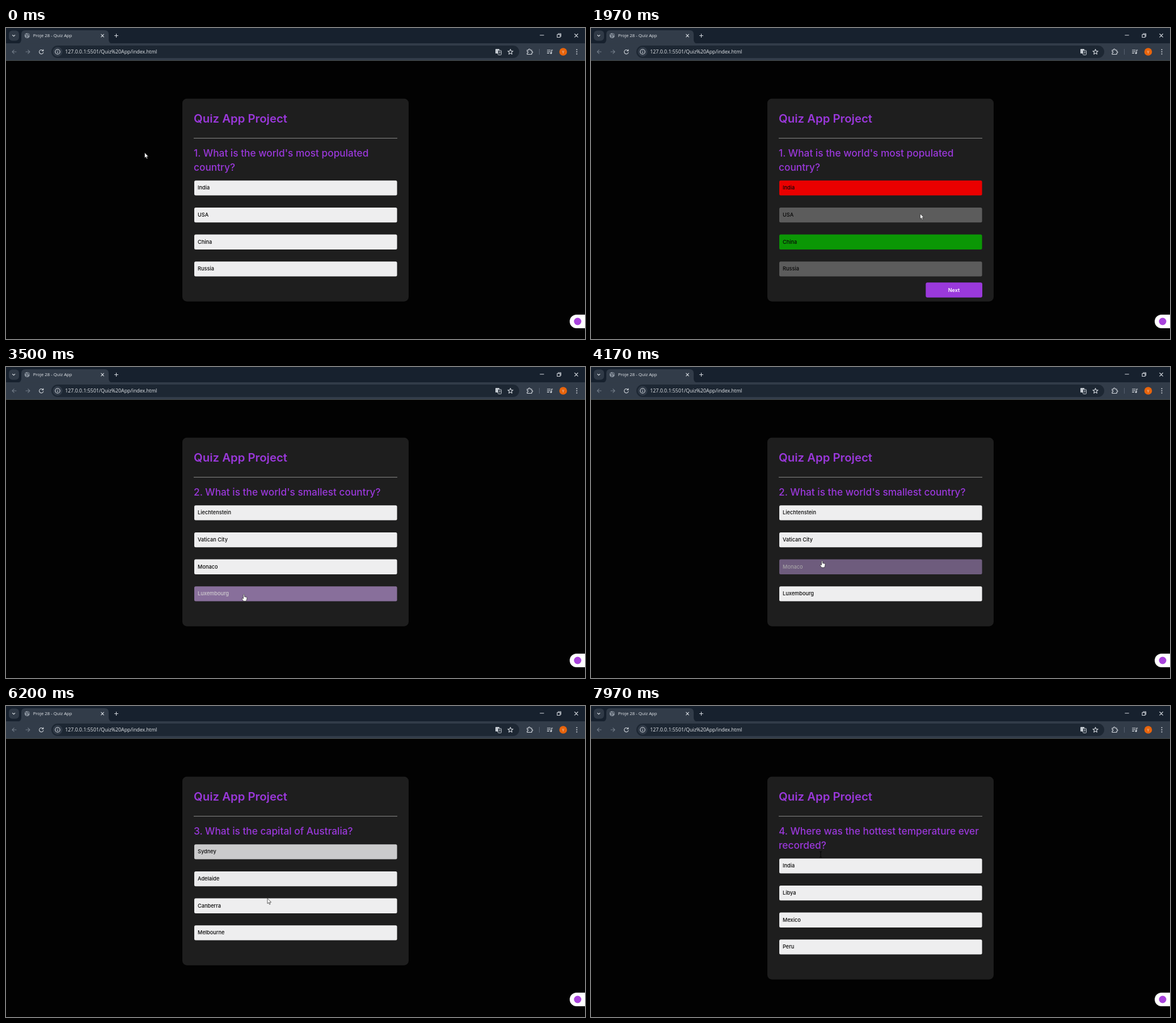
An HTML page for the animation above (8 s loop, 1021x549 px).

```html
<!DOCTYPE html>
<html lang="en">
<head>
<meta charset="utf-8">
<title>Quiz App</title>
<style>
html, body { margin: 0; width: 100%; height: 100%; overflow: hidden; background: #020202; }
svg { display: block; width: 100%; height: 100%; }
.ui { font-family: "Open Sans", "Noto Sans", sans-serif; fill: #e6e9ed; }
.quiz { font-family: Inter, "Open Sans", sans-serif; font-weight: 500; }
.icon { fill: none; stroke: #d3d8de; stroke-width: 1.1; stroke-linecap: round; stroke-linejoin: round; }
.dim { stroke: #737d89; }
</style>
</head>
<body>
<svg viewBox="0 0 1021 549">
  <rect width="1021" height="549" fill="#020202"/>

  <!-- Browser window -->
  <rect width="1021" height="28" fill="#17212e"/>
  <rect y="27" width="1021" height="31" fill="#323c49"/>
  <path d="M0 57.5H1021" stroke="#484d4c"/>
  <rect x="5" y="4.500" width="18" height="18" rx="6" fill="#303a47"/>
  <path class="icon" d="M11.500 12.500l2.100 2.100 2.100-2.100"/>
  <path d="M20 27.500Q27 27.500 27 20V11Q27 4 34 4H174Q181 4 181 11V20Q181 27.500 188 27.500Z" fill="#323c49"/>
  <circle cx="37.300" cy="13.500" r="4.600" fill="#89929d"/>
  <path d="M34 11.500q3 0 3.200 2.200t-1.200 3M38.500 9.500q-.5 2.500 3 3.500" fill="none" stroke="#3c4653" stroke-width="1.200"/>
  <text class="ui" x="47.700" y="16.300" font-size="7.750">Proje 28 - Quiz App</text>
  <path class="icon" d="M167.800 11.200l4.600 4.600m0-4.600l-4.600 4.600M191.500 13.500h6m-3-3v6"/>
  <g class="icon" stroke-width="1">
    <path d="M941.800 12.700h6.500"/>
    <path d="M972 11.500h5v5h-5zM973.500 10h5v5"/>
    <path d="M1002.800 10.500l5.600 5.600m0-5.600l-5.600 5.600"/>
  </g>
  <path class="icon dim" d="M18 42h-7m3.200-3.200L11 42l3.200 3.200M35 42h7m-3.200-3.200L42 42l-3.200 3.200"/>
  <path class="icon" d="M65.300 40a3.700 3.700 0 1 0 .6 3M65.800 38v2.500h-2.500"/>
  <rect x="80" y="31" width="825" height="22" rx="11" fill="#1d2733"/>
  <circle cx="91" cy="42" r="8.500" fill="#303a47"/>
  <g class="icon"><circle cx="91" cy="42" r="4.200"/><path d="M91 42v2M91 40v.1"/></g>
  <text class="ui" x="104.300" y="45.200" font-size="8.800">127.0.0.1:5501/Quiz%20App/index.html</text>
  <rect x="863" y="37" width="7" height="8" rx="1" fill="#c3c9d0"/>
  <rect x="867.500" y="39.500" width="6" height="8" rx="1" fill="#1d2733" stroke="#c3c9d0"/>
  <path d="M869 42h3.400m-1.700-1v1m1 0q-.6 2.300-2.500 3m.5-2q.8 1.500 2.300 2" fill="none" stroke="#c3c9d0" stroke-width=".7"/>
  <path id="star" class="icon"/>
  <path class="icon" d="M919 39h2.500q-.3-2 1.300-2t1.300 2h2.900v2.400q1.800-.2 1.800 1.300t-1.800 1.300V46.500h-8v-2.400q1.700 0 1.700-1.400t-1.700-1.300z"/>
  <path d="M940.500 37v10" stroke="#566170"/>
  <path class="icon" d="M954.500 39h5.500m-5.500 2.700h5.500m-5.500 2.700h3M962 44.500v-5.500h1.800"/>
  <circle cx="961" cy="44.500" r="1.400" fill="#d3d8de"/>
  <circle cx="982.500" cy="42" r="6.800" fill="#e8640c"/>
  <text class="ui" x="982.500" y="44.500" font-size="6.800" text-anchor="middle">Y</text>
  <g fill="#d3d8de"><circle cx="1006.500" cy="38.300" r="1"/><circle cx="1006.500" cy="42" r="1"/><circle cx="1006.500" cy="45.700" r="1"/></g>

  <!-- Quiz card -->
  <g class="quiz">
    <rect id="card" x="311" y="124.700" width="399" rx="8" fill="#1e1e1e"/>
    <text x="331" y="166.800" font-size="20.350" font-weight="600" fill="#9a38da">Quiz App Project</text>
    <path d="M331 194.600H690" stroke="#989896" stroke-width=".9"/>
    <g font-size="17.300" fill="#9a38da">
      <text id="line0" x="331" y="226.500"/>
      <text id="line1" x="331" y="251.500"/>
    </g>
    <g id="options" font-size="9.200"></g>
    <g id="next">
      <rect x="590.300" y=".3" width="99.700" height="26.400" rx="3" fill="#9a39db"/>
      <text x="640" y="16.700" font-size="9" font-weight="600" text-anchor="middle" fill="#fff">Next</text>
    </g>
  </g>

  <!-- Side widget -->
  <path d="M1021 506H1006a12 12 0 0 0 0 24H1021Z" fill="#fff"/>
  <circle cx="1008" cy="518" r="6.500" fill="#a843dc"/>

  <g id="pointer" stroke-linejoin="round">
    <path id="arrow" d="M0 0V9.300L2.100 7.400L3.600 10.800L5.100 10.100L3.600 6.900H6.600Z" fill="#fff" stroke="#222" stroke-width=".7"/>
    <path id="hand" d="M-1 .8Q0-.5 1 .8V4.300L4.500 5Q5.600 5.300 5.500 6.500L5 9.500L4 12H-.8L-3.400 8.200Q-4 6.800-2.600 6.700L-1 7.800Z" fill="#fff" stroke="#222" stroke-width=".7"/>
    <path id="beam" d="M-2-5Q0-5 0-4Q0-5 2-5M0-4V4M-2 5Q0 5 0 4Q0 5 2 5" fill="none" stroke="#000" stroke-width=".9"/>
  </g>
</svg>
<script>
const LOOP = 8000, FADE = 260, PITCH = 47.7, HOVER_FADE = 0.4;
const $ = id => document.getElementById(id);

// hovers: [option, enter, leave]
const questions = [
  { start: 0, lines: ["1. What is the world's most populated", "country?"],
    options: ["India", "USA", "China", "Russia"], correct: 2, picked: 0, answered: 1600,
    hovers: [[0, 490, 590], [0, 1205, 1800]] },
  { start: 2800, lines: ["2. What is the world's smallest country?"],
    options: ["Liechtenstein", "Vatican City", "Monaco", "Luxembourg"], correct: 1, picked: 1, answered: 4500,
    hovers: [[3, 3365, 3832], [2, 3905, 4193], [1, 4268, 4700]] },
  { start: 4960, lines: ["3. What is the capital of Australia?"],
    options: ["Sydney", "Adelaide", "Canberra", "Melbourne"], correct: 2, picked: 2, answered: 6500,
    hovers: [[1, 5140, 5450], [0, 5524, 6050], [1, 6089, 6150], [2, 6215, 6700]] },
  { start: 7560, lines: ["4. Where was the hottest temperature ever", "recorded?"],
    options: ["India", "Libya", "Mexico", "Peru"], answered: Infinity, hovers: [] }
];

// time, x, y
const path = [
  [0, 244.5, 220], [250, 244.5, 220], [700, 580, 309], [1060, 580, 309], [1350, 560, 284],
  [1700, 560, 284], [2570, 648.6, 473.6], [2700, 653, 464], [2950, 653, 464], [3550, 415, 400],
  [3750, 415, 400], [4000, 407, 350], [4170, 407.5, 342], [4330, 409, 306], [4600, 409, 306],
  [4880, 640, 438], [4980, 640, 438], [5200, 464, 304], [5400, 463.5, 299], [5600, 462, 258],
  [6000, 462, 258], [6200, 461, 339.5], [6320, 461, 353], [6620, 461, 353], [7300, 630, 427],
  [7580, 630, 427], [7780, 405, 262], [LOOP, 405, 262]
];

const white = [238, 238, 239], violet = [164, 133, 188], panel = [30, 30, 30];
const black = [8, 8, 8], brightText = [255, 250, 255];
const red = [234, 0, 0], green = [11, 151, 5], grey = [92, 92, 92];

const clamp = v => Math.max(0, Math.min(1, v));
const mix = (a, b, k) => a.map((v, i) => v + (b[i] - v) * k);
const rgb = c => `rgb(${c.map(Math.round)})`;
const show = (id, on) => $(id).setAttribute("display", on ? "inline" : "none");

function make(tag, attrs) {
  const node = document.createElementNS("http://www.w3.org/2000/svg", tag);
  for (const key in attrs) node.setAttribute(key, attrs[key]);
  return $("options").appendChild(node);
}

const rows = [0, 1, 2, 3].map(() => ({
  box: make("rect", { x: 332, width: 357.6, height: 26.3, rx: 2.5 }),
  label: make("text", { x: 338 })
}));

$("star").setAttribute("d", "M" + Array.from({ length: 10 }, (_, i) => {
  const a = i * Math.PI / 5, r = i % 2 ? 2.1 : 4.8;
  return `${889.5 + r * Math.sin(a)} ${42.3 - r * Math.cos(a)}`;
}).join("L") + "Z");

function pointerAt(t) {
  const i = path.findIndex(p => p[0] > t);
  const [t0, x0, y0] = path[i - 1], [t1, x1, y1] = path[i];
  const u = (t - t0) / (t1 - t0), k = u * u * (3 - 2 * u);
  return [x0 + (x1 - x0) * k, y0 + (y1 - y0) * k];
}

// Colours switch at once on hover; only the opacity eases.
function optionColors(q, option, t) {
  const hovers = q.hovers.filter(h => h[0] === option);
  const inside = hovers.some(([, enter, leave]) => t >= enter && t < leave);
  const level = Math.max(0, ...hovers.map(([, enter, leave]) =>
    clamp((Math.min(t, leave) - enter) / FADE) - Math.max(0, t - leave) / FADE));
  const fade = color => mix(color, panel, HOVER_FADE * level);
  return inside ? [fade(violet), fade(brightText)] : [fade(white), fade(black)];
}

function resultColor(q, i) {
  return i === q.correct ? green : i === q.picked ? red : grey;
}

function pointerKind(x, y, q, top, answered) {
  if (x < 331 || x > 690) return "arrow";
  if (answered) return x > 590 && y > top + 181 && y < top + 203 ? "hand" : "arrow";
  if (y > 208 && y < top - 5) return "beam";
  const offset = (y - top) % PITCH;
  return y > top && y < top + 4 * PITCH && offset > 1.5 && offset < 26.8 ? "hand" : "arrow";
}

function draw(t) {
  const q = questions.filter(item => t >= item.start).pop();
  const top = 219 + 25 * q.lines.length;
  const answered = t >= q.answered;

  $("card").setAttribute("height", top + 89);
  [0, 1].forEach(i => $("line" + i).textContent = q.lines[i] || "");

  rows.forEach(({ box, label }, i) => {
    const y = top + i * PITCH, done = clamp((t - q.answered) / FADE);
    const [fill, ink] = optionColors(q, i, Math.min(t, q.answered));
    box.setAttribute("y", y + 0.2);
    box.setAttribute("fill", rgb(answered ? mix(fill, resultColor(q, i), done) : fill));
    label.setAttribute("y", y + 16.3);
    label.setAttribute("fill", rgb(mix(ink, black, done)));
    label.textContent = q.options[i];
  });

  show("next", answered);
  $("next").setAttribute("transform", `translate(0 ${top + 180})`);

  const [x, y] = pointerAt(t), kind = pointerKind(x, y, q, top, answered);
  $("pointer").setAttribute("transform", `translate(${x} ${y})`);
  ["arrow", "hand", "beam"].forEach(id => show(id, id === kind));
}

const began = performance.now();
function tick() {
  draw((performance.now() - began) % LOOP);
  requestAnimationFrame(tick);
}
tick();
</script>
</body>
</html>
```
